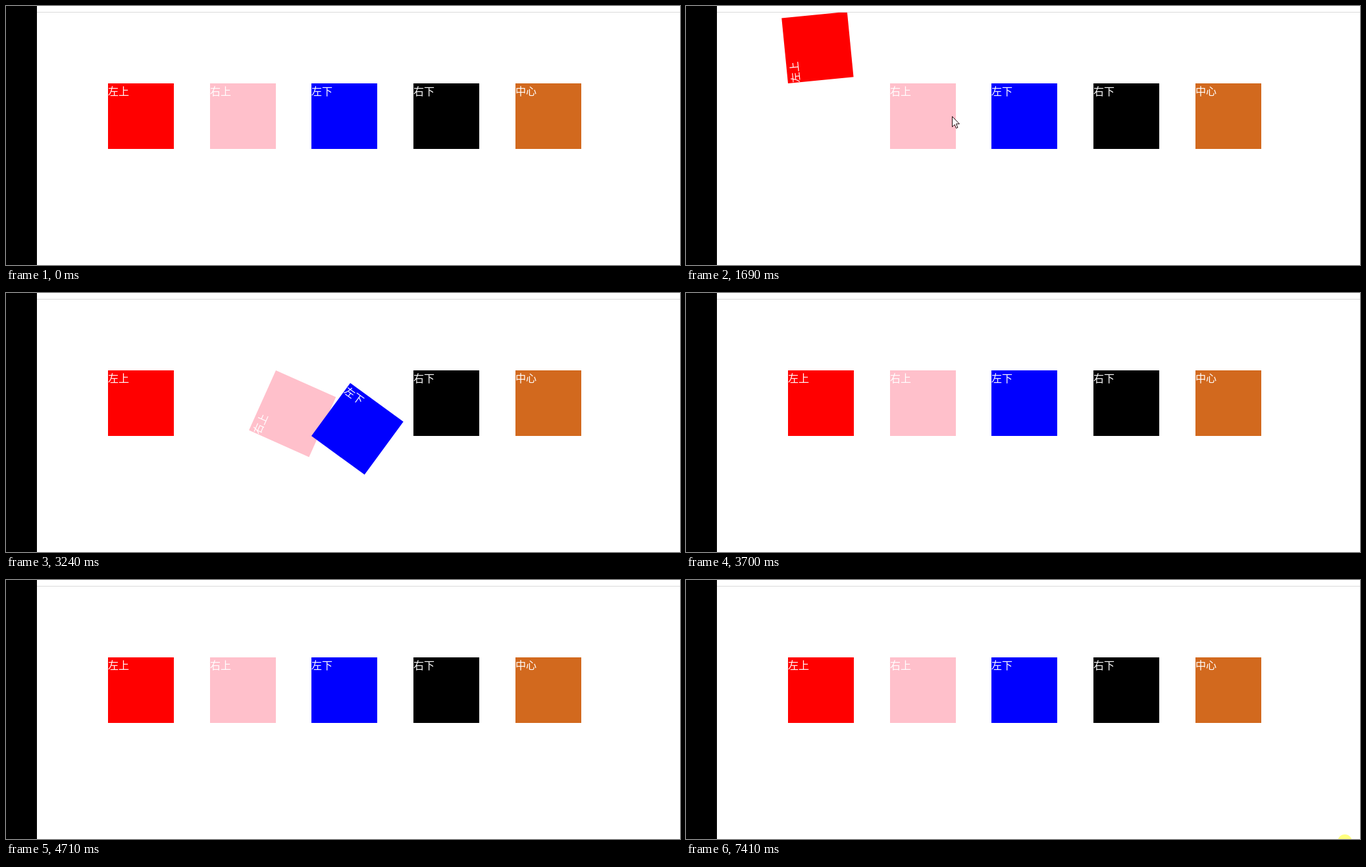
Recreate the animation shown at these times as an HTML page. Size 1024 by 395 pixels, loop 7490 ms.

```html
<!DOCTYPE html>
<html lang="zh">
<head>
<meta charset="utf-8">
<title>transform-origin</title>
<style>
  html, body { margin: 0; width: 100%; height: 100%; overflow: hidden; background: #fff; }
  #stage { position: relative; width: 1024px; height: 395px; overflow: hidden; }
  #side { position: absolute; left: 0; top: 0; width: 47px; height: 395px; background: #000; }
  #rule { position: absolute; left: 47px; top: 9px; width: 977px; height: 1px; background: #dadada; }
  #view { position: absolute; left: 47px; top: 10px; width: 977px; height: 385px; overflow: hidden; }
  .box {
    position: absolute; top: 108px; width: 100px; height: 100px;
    color: #fff; font: 16px/23px "Noto Sans CJK SC", "Noto Sans CJK", sans-serif;
  }
  #click {
    position: absolute; left: 990px; top: 388px; width: 22px; height: 22px;
    border-radius: 50%; background: #ffff80;
  }
  #cursor { position: absolute; left: 0; top: 0; width: 13px; height: 20px; overflow: visible; }
</style>
</head>
<body>
<div id="stage">
  <div id="side"></div>
  <div id="rule"></div>
  <div id="view"></div>
  <div id="click"></div>
  <svg id="cursor" viewBox="0 0 13 20">
    <path d="M.5 .5V16.3L4.1 12.9L6.5 18.4L8.9 17.4L6.5 11.8H11.4Z" fill="#fff" stroke="#200a0e" stroke-width="1"/>
  </svg>
</div>
<script>
const LOOP = 7490, TICK = 77.2, LAST = 96;
const STEP = 54; // degrees turned per tick

// enter / leave: ticks at which the pointer starts and ends hovering
const boxes = [
  { text: "左上", color: "red",       origin: "left top",     enter: 8.67,  leave: 20.23 },
  { text: "右上", color: "pink",      origin: "right top",    enter: 28.23, leave: 40.78 },
  { text: "左下", color: "blue",      origin: "left bottom",  enter: 41.33, leave: 53.76 },
  { text: "右下", color: "black",     origin: "right bottom", enter: 54.13, leave: 65.15 },
  { text: "中心", color: "chocolate", origin: "center",       enter: 65.6,  leave: 80.3 }
];

// pointer moves; it rests in between
const moves = [
  { from: 0,  to: 10, x: 232,  y: 170 },
  { from: 19, to: 22, x: 404,  y: 168 },
  { from: 24, to: 29, x: 357,  y: 163 },
  { from: 40, to: 43, x: 518,  y: 163 },
  { from: 52, to: 56, x: 660,  y: 161 },
  { from: 64, to: 68, x: 848,  y: 161 },
  { from: 79, to: 89, x: 988,  y: 356 },
  { from: 89, to: 93, x: 1001, y: 399 }
];

const byId = id => document.getElementById(id);
const clamp = (v, lo, hi) => Math.min(hi, Math.max(lo, v));
const ease = k => k * k * (3 - 2 * k);

boxes.forEach((b, i) => {
  const el = b.el = document.createElement("div");
  el.className = "box";
  el.textContent = b.text;
  el.style.left = Math.round(108 + 154.7 * i) + "px";
  el.style.background = b.color;
  el.style.transformOrigin = b.origin;
  byId("view").append(el);
});

// turns forward while hovered, back again afterwards
function angle(b, tick) {
  const since = t => clamp((tick - t) * STEP, 0, 360);
  return since(b.enter) - since(b.leave);
}

function pointer(tick) {
  let x = 856, y = 400;
  for (const m of moves) {
    const k = ease(clamp((tick - m.from) / (m.to - m.from), 0, 1));
    x += (m.x - x) * k;
    y += (m.y - y) * k;
  }
  return [Math.round(x), Math.round(y)];
}

function draw(ms) {
  const tick = Math.min(LAST, Math.floor((ms % LOOP + 15) / TICK));
  for (const b of boxes) {
    const a = angle(b, tick);
    b.el.style.transform = a % 360 ? `rotate(${a}deg)` : "none";
    b.el.style.zIndex = a > 0 ? 1 : 0;
  }
  const [x, y] = pointer(tick);
  byId("cursor").style.transform = `translate(${x}px, ${y}px)`;
  byId("click").style.display = tick === LAST ? "block" : "none";
}

const start = performance.now();
function loop() {
  draw(performance.now() - start);
  requestAnimationFrame(loop);
}
loop();
</script>
</body>
</html>
```
